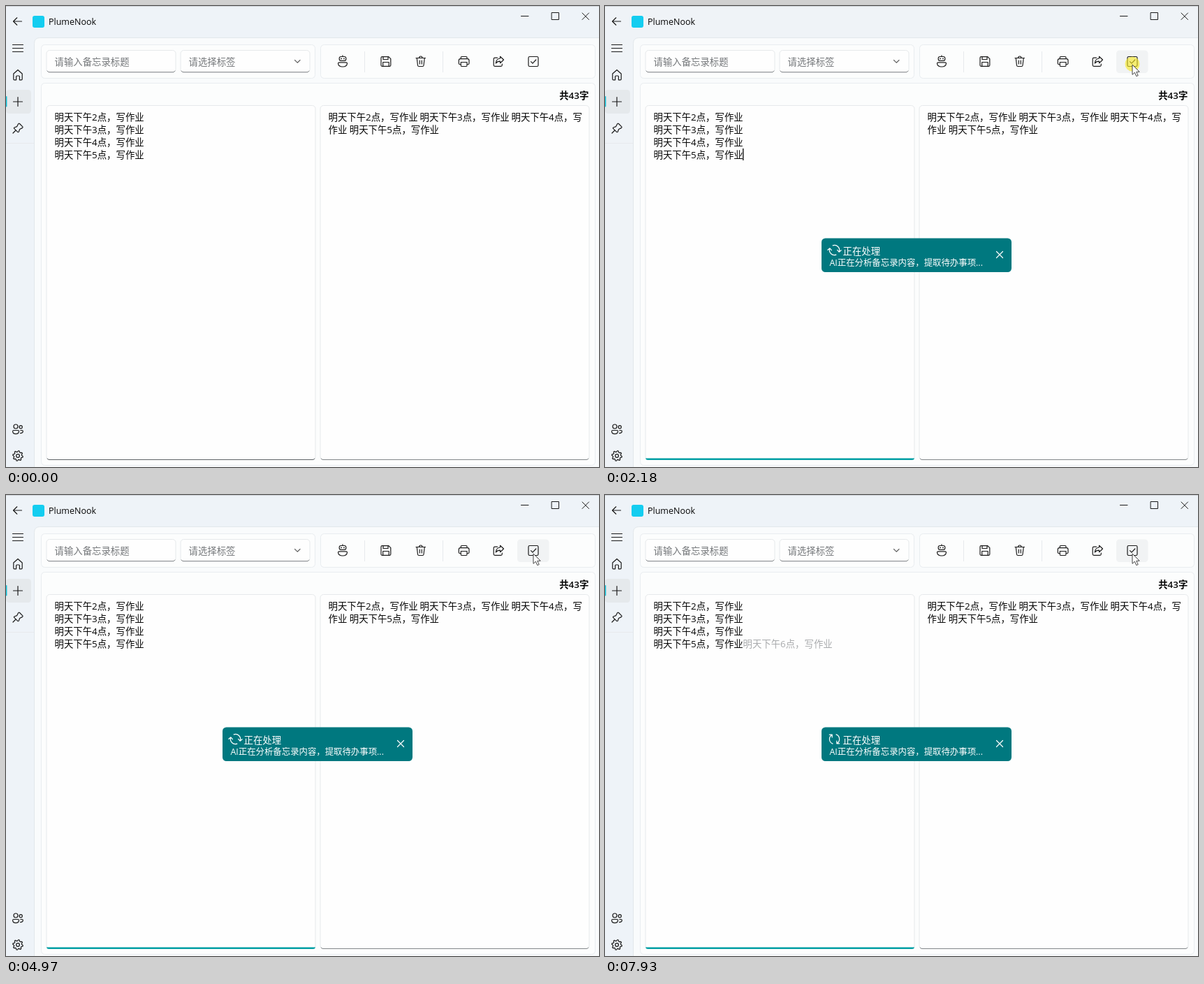
Write an HTML page that moves like this. It is 849 px wide and 660 px high and loops after 8 s.

```html
<!DOCTYPE html>
<html lang="zh-CN">
<head>
<meta charset="utf-8">
<style>
html, body { margin: 0; width: 100%; height: 100%; overflow: hidden; }
svg { display: block; width: 849px; height: 660px; }
text { font: 13.4px "Open Sans", "Noto Sans CJK SC", "Noto Sans CJK", sans-serif; fill: #050505; white-space: pre; }
.hint { fill: #74777a; }
.icon { fill: none; stroke: #1b1b1b; stroke-width: 1.2; stroke-linecap: round; stroke-linejoin: round; }
.card { fill: #fff; fill-opacity: .5; stroke: #e9edf0; }
.box { fill: #fefefe; stroke: #e6e9eb; }
.rule { stroke: #e7eaed; }
.under { fill: none; stroke: #83878a; stroke-linecap: round; }
.light { stroke: #fff; }
</style>
</head>
<body>
<svg viewBox="0 0 849 660">
  <rect id="back" width="849" height="660"/>
  <path d="M0 .5H849" stroke="#cdd1d5"/>
  <path d="M40.5 661V53.5Q40.5 45.500 48.500 45.500H850V661Z" fill="#fff" fill-opacity=".66" stroke="#e2e7eb"/>

  <rect x="38" y="14" width="17" height="17" rx="3" fill="#14cdf0"/>
  <text x="61" y="27.300" style="font-size:12.500px">PlumeNook</text>

  <rect y="120" width="36" height="34" rx="4.500" fill="#e5e9ec"/>
  <rect y="129" width="1.400" height="15.500" rx=".7" fill="#0fc0d8"/>
  <path class="rule" d="M0 196.500H40"/>

  <g class="icon">
    <path d="M22.500 22H10.500M15.800 16.800L10.500 22L15.800 27.200"/>
    <path d="M737.500 14.500H748M781.500 9.500H791.500V19.500H781.500ZM825 10L834.500 19.500M834.500 10L825 19.500" stroke-width="1"/>
    <path d="M9.500 55.500H24.500M9.500 60.500H24.500M9.500 65.500H24.500" stroke-width="1.100"/>
    <path d="M10.800 97L17 91.500L23.200 97V104.500Q23.200 105.800 22 105.800H19.400V101Q19.400 100 18.500 100H15.500Q14.600 100 14.600 101V105.800H12Q10.800 105.800 10.800 104.500Z"/>
    <path d="M10.500 137H23.500M17 130.500V143.500"/>
    <path d="M19.500 168.500L23.800 172.800Q24.500 174 23.200 174.600L19.600 176.500L18.200 180.200Q17.600 181.200 16.700 180.400L11.700 175.400Q11 174.500 12 174L15.700 172.600L17.500 169Q18.300 167.700 19.500 168.500ZM14 178L10 182"/>
    <circle cx="14" cy="602" r="3"/><circle cx="21.200" cy="602.800" r="2.100"/>
    <path d="M11 607.500H17.200Q18.500 607.500 18.500 609Q18.300 612.600 14 612.600T9.600 609Q9.600 607.500 11 607.500ZM20.800 607.500H23Q24.300 607.500 24.300 609Q24 611.800 20.500 611.600"/>
    <path id="gear"/><circle cx="17" cy="644" r="2.400"/>
  </g>

  <rect class="card" x="50.500" y="55.500" width="392" height="48" rx="5"/>
  <rect class="card" x="450.500" y="55.500" width="393" height="48" rx="5"/>
  <rect class="card" x="50.500" y="110.500" width="793" height="547" rx="5"/>
  <rect class="box" x="58" y="63.500" width="185" height="31.500" rx="4.500"/>
  <rect class="box" x="250" y="63.500" width="185" height="31.500" rx="4.500"/>
  <rect class="box" x="58" y="142.500" width="385" height="507" rx="4.500"/>
  <rect class="box" x="450" y="142.500" width="385" height="507" rx="4.500"/>
  <path class="under" d="M59 93Q60 94.700 62 94.700H239Q241 94.700 242 93M251 93Q252 94.700 254 94.700H431Q433 94.700 434 93M451 648Q452 649.500 454 649.500H831Q833 649.500 834 648"/>
  <path id="idle" class="under" d="M59 648Q60 649.500 62 649.500H439Q441 649.500 442 648" style="stroke:#5f6366"/>
  <path id="focus" d="M58 647.500H443Q442.500 650 439.500 650H61.500Q58.500 650 58 647.500Z" fill="#009fa4"/>
  <text class="hint" x="69.500" y="84.500">请输入备忘录标题</text>
  <text class="hint" x="261.500" y="84.500">请选择标签</text>
  <text x="834.300" y="132.800" text-anchor="end" style="font-weight:600">共43字</text>
  <path class="rule" d="M513.500 65V95M625.500 65V95"/>
  <rect id="hover" x="732" y="63.500" width="45.500" height="32.500" rx="4.500"/>

  <g class="icon">
    <path d="M413.500 77.500L417.200 81.200L421 77.500" stroke="#666"/>
    <path d="M482 70.800V72.500M479.500 72.500H484.500Q486.800 72.500 486.800 74.800V76Q486.800 78.300 484.500 78.300H479.500Q477.200 78.300 477.200 76V74.800Q477.200 72.500 479.500 72.500ZM477 80.800H487Q488.500 80.800 488.500 82.300Q488 87 482 87T475.500 82.300Q475.500 80.800 477 80.800Z"/>
    <path d="M480 75.300V75.400M484 75.300V75.400" stroke-width="1.800"/>
    <path d="M538.500 72.700H547.800L550.800 75.700V84.800Q550.800 86.300 549.300 86.300H538.500Q537 86.300 537 84.800V74.200Q537 72.700 538.500 72.700ZM540 72.900V76.500H547V72.900M539.700 86V80.500H548.200V86"/>
    <path d="M587 74.500H600.500M591.500 74.300Q591.600 72 593.800 72T596 74.300M588.300 74.700L589.500 85Q589.700 86.500 591.200 86.500H596.300Q597.800 86.500 598 85L599.200 74.700M592.300 78V83M595.300 78V83"/>
    <path d="M651.300 75.500V73.500Q651.300 72.500 652.500 72.500H658.800Q660 72.500 660 73.500V75.500M651 83.500H649.500Q648.300 83.500 648.300 82V78Q648.300 75.700 650.500 75.700H660.800Q663 75.700 663 78V82Q663 83.500 661.800 83.500H660.300M651.300 80.500H660V85.300Q660 86.500 658.800 86.500H652.500Q651.300 86.500 651.300 85.300Z"/>
    <path d="M703.500 74.200H700Q698.200 74.200 698.200 76V84.500Q698.200 86.300 700 86.300H708.500Q710.300 86.300 710.300 84.500V83M707.500 72.300L712.500 77L707.500 81.700V79.200Q703.500 79 701.300 82Q701.800 75.500 707.500 75Z"/>
    <path d="M749.800 72.500H760.200Q762 72.500 762 74.300V84.700Q762 86.500 760.200 86.500H749.800Q748 86.500 748 84.700V74.300Q748 72.500 749.800 72.500ZM751.500 79.700L754 82.200L758.800 77"/>
  </g>

  <g id="memo"></g>
  <text id="ghost" x="197.500" y="218.300" style="fill:#a9abad">明天下午6点，写作业</text>
  <path id="caret" d="M197.800 204V221" stroke="#000" stroke-width="1.300"/>

  <g id="toast">
    <rect x="310" y="332.500" width="272" height="48.500" rx="5.500" fill="#00787f"/>
    <g id="spin" class="icon light">
      <path d="M-2.500 6.600A7 7 0 0 1 -3.500 -6.100M-7.200 -6.300H-3.300V-2.500"/>
      <path d="M2.500 -6.600A7 7 0 0 1 3.500 6.100M7.200 6.300H3.300V2.500"/>
    </g>
    <text x="340.500" y="355.600" style="fill:#fff">正在处理</text>
    <text x="321.500" y="371.600" style="fill:#fff;font-size:12.400px">AI正在分析备忘录内容，提取待办事项...</text>
    <path class="icon light" d="M560.500 351.500L569.500 360.500M569.500 351.500L560.500 360.500"/>
  </g>

  <circle id="halo" r="10.500" fill="#f7e823"/>
  <path id="mouse" d="M0 0V14.300L3.400 11.200L5.800 16.600L8.200 15.500L5.800 10.400L10.200 10.200Z" fill="#fff" stroke="#333" stroke-width=".9" stroke-linejoin="round"/>
</svg>
<script>
const $ = id => document.getElementById(id);
const show = (id, on) => $(id).style.display = on ? "" : "none";
const ramp = (t, a, b) => Math.min(1, Math.max(0, (t - a) / (b - a)));
const mix = (a, b, k) => a + (b - a) * k;

const LOOP = 8000, PRESS = 1850, RELEASE = 1990, FOCUS = 1880, TOAST = 2110, GHOST = 7300;
const BLINK = 1090, TICK = 62.5;

const put = (x, y, s) => {
  const el = document.createElementNS("http://www.w3.org/2000/svg", "text");
  el.setAttribute("x", x);
  el.setAttribute("y", y);
  el.textContent = s;
  $("memo").append(el);
};
for (let i = 0; i < 4; i++) put(69.5, 163.7 + i * 18.2, `明天下午${i + 2}点，写作业`);
put(461.5, 163.7, "明天下午2点，写作业");
put(592.5, 163.7, "明天下午3点，写作业");
put(723.5, 163.7, "明天下午4点，写");
put(461.5, 181.9, "作业");
put(491.8, 181.9, "明天下午5点，写作业");

// Eight teeth, four corners each
$("gear").setAttribute("d", "M" + Array.from({ length: 32 }, (_, i) => {
  const a = (i + .5) * Math.PI / 16, r = i % 4 < 2 ? 7.3 : 5.6;
  return `${(17 + r * Math.cos(a)).toFixed(2)} ${(644 + r * Math.sin(a)).toFixed(2)}`;
}).join("L") + "Z");

function mouseAt(t) {
  if (t < 1280) {
    const k = ramp(t, 880, 1020);
    return [mix(771, 753, k), mix(636, 241, k)];
  }
  const k = 1 - (1 - ramp(t, 1280, 1750)) ** 2;
  return [mix(753, 755, k), mix(241, 84, k)];
}

function draw(t) {
  // The backdrop turns grey while the window is inactive
  const grey = ramp(t, 70, 480) - ramp(t, 1880, 2300);
  $("back").setAttribute("fill", `rgb(${mix(238, 242, grey)},243,${mix(248, 244, grey)})`);

  const [x, y] = mouseAt(t);
  show("mouse", t >= 880);
  $("mouse").setAttribute("transform", `translate(${x} ${y})`);
  show("halo", t >= PRESS && t < 2450);
  $("halo").setAttribute("transform", `translate(${x} ${y - 1})`);
  $("halo").setAttribute("opacity", .62 * (1 - ramp(t, 2200, 2450)));

  show("hover", t >= 1280 && y < 96);
  $("hover").setAttribute("fill", t >= PRESS && t < RELEASE ? "#f8f9fa" : "#f1f3f4");

  const focused = t >= FOCUS;
  show("focus", focused);
  show("idle", !focused);
  show("caret", focused && (t - FOCUS) % BLINK < BLINK / 2);
  show("ghost", t >= GHOST);

  show("toast", t >= TOAST);
  const angle = 20 * Math.floor((t - 6220) / TICK);
  $("spin").setAttribute("transform", `translate(328.5 349.5) rotate(${angle})`);
}

function frame(now) {
  draw(now % LOOP);
  requestAnimationFrame(frame);
}
draw(0);
requestAnimationFrame(frame);
</script>
</body>
</html>
```
